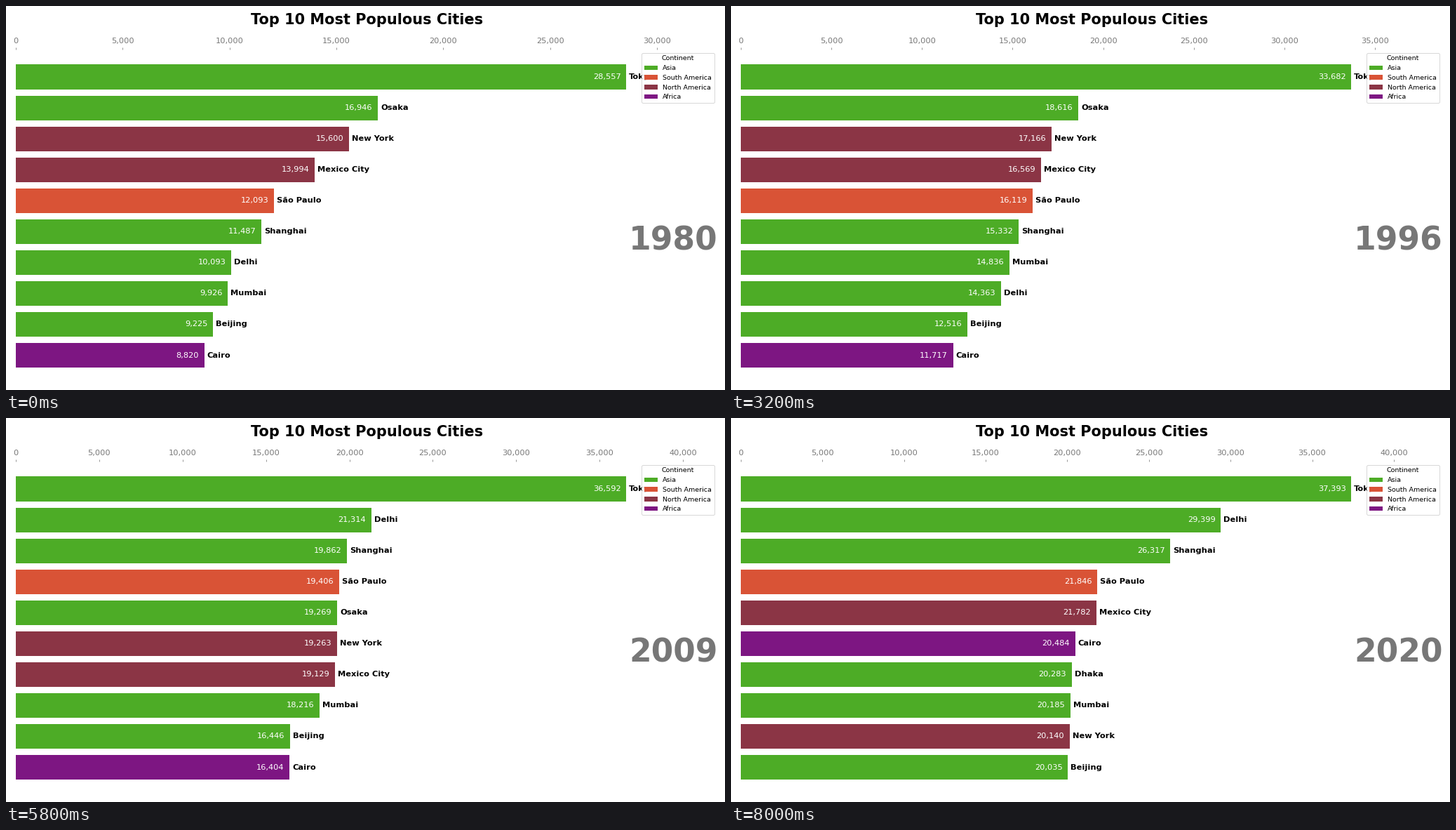
Write a matplotlib script that moves like this. It is 1025 by 547 pixels and loops after 8200 ms.

```python
import matplotlib.pyplot as plt
import numpy as np
from matplotlib.animation import FuncAnimation
from matplotlib.patches import Patch
from matplotlib.ticker import MultipleLocator

W, H, DPI = 1025, 547, 72
S = W / 15 / DPI  # layout is designed for a 15 inch wide figure
GREY = "#777777"

plt.rcParams.update({
    "font.family": "DejaVu Sans",
    "font.size": 10 * S,
    "xtick.major.size": 3.5 * S,
    "xtick.major.width": 0.8 * S,
    "xtick.major.pad": 3.5 * S,
    "patch.linewidth": S,
})

COLORS = {
    "Asia": "#4dac26",
    "South America": "#d95336",
    "North America": "#8b3545",
    "Africa": "#7d1682",
}

# Population in thousands at the key years, linear in between
KEY_YEARS = [1980, 1987, 1992, 1996, 2003, 2009, 2014, 2020]
CITIES = {
    "Tokyo": ("Asia", [28557, 31338, 32996, 33682, 35164, 36592, 37055, 37393]),
    "Osaka": ("Asia", [16946, 17956, 18400, 18616, 18935, 19269, 19284, 19165]),
    "New York": ("North America", [15600, 15935, 16480, 17166, 18348, 19263, 19706, 20140]),
    "Mexico City": ("North America", [13994, 14914, 15800, 16569, 17982, 19129, 20305, 21782]),
    "São Paulo": ("South America", [12093, 13971, 15230, 16119, 17812, 19406, 20542, 21846]),
    "Shanghai": ("Asia", [11487, 12790, 14150, 15332, 17723, 19862, 22658, 26317]),
    "Delhi": ("Asia", [10093, 11649, 13100, 14363, 17589, 21314, 24921, 29399]),
    "Mumbai": ("Asia", [9926, 11686, 13450, 14836, 17028, 18216, 19122, 20185]),
    "Beijing": ("Asia", [9225, 10371, 11500, 12516, 14561, 16446, 18070, 20035]),
    "Cairo": ("Africa", [8820, 10098, 10950, 11717, 13755, 16404, 18301, 20484]),
    "Dhaka": ("Asia", [3266, 5300, 7000, 8700, 11600, 14300, 16982, 20283]),
}

fig, ax = plt.subplots(figsize=(W / DPI, H / DPI), dpi=DPI, facecolor="white")
handles = [Patch(facecolor=c, label=name) for name, c in COLORS.items()]


def top_ten(year):
    """Return (value, city, color) rows, smallest first."""
    rows = [(np.interp(year, KEY_YEARS, pops), city, COLORS[continent])
            for city, (continent, pops) in CITIES.items()]
    return sorted(rows)[-10:]


def draw(i):
    year = KEY_YEARS[0] + i
    values, names, colors = zip(*top_ten(year))
    top = values[-1]

    ax.clear()
    ax.barh(range(10), values, color=colors)
    for y, (value, name) in enumerate(zip(values, names)):
        ax.text(value - top * 0.0088, y, f"{value:,.0f}", color="white",
                size=12 * S, ha="right", va="center")
        ax.text(value + top * 0.0046, y, name, weight="bold",
                size=12 * S, ha="left", va="center")
    ax.text(1, 0.3975, str(year), transform=ax.transAxes, color=GREY,
            size=48 * S, weight="bold", ha="right")

    ax.set_xlim(0, top * 1.15)
    ax.xaxis.set_major_locator(MultipleLocator(5000))
    ax.xaxis.set_major_formatter("{x:,.0f}")
    ax.xaxis.set_ticks_position("top")
    ax.tick_params(axis="x", colors=GREY, labelsize=12 * S)
    ax.set_yticks([])
    ax.set_frame_on(False)
    ax.set_title("Top 10 Most Populous Cities", size=22 * S, weight="bold", pad=20 * S)
    ax.legend(handles=handles, title="Continent", loc="upper right")

    # Same starting layout each time, then make room for the tick labels
    fig.subplots_adjust(left=0.0135, right=0.99, top=0.885, bottom=0.0187)
    fig.tight_layout()
    return []


anim = FuncAnimation(fig, draw, frames=41, init_func=lambda: [],
                     interval=200, repeat=True, repeat_delay=0)
plt.show()
```
